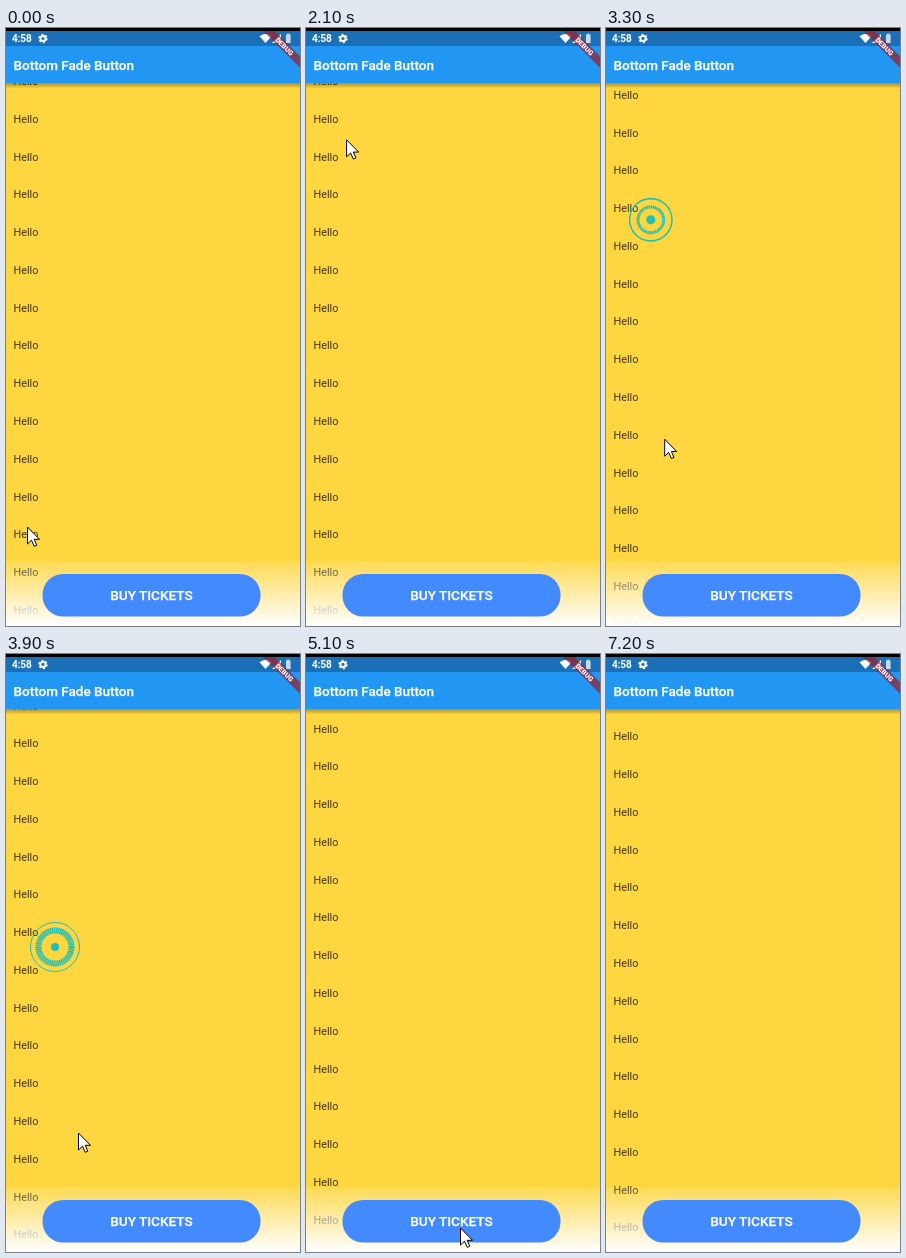
Animation of 294 by 598 pixels, one loop 7.6 s. Source, as an HTML page:

```html
<!DOCTYPE html>
<html lang="en">
<head>
<meta charset="utf-8">
<title>Bottom Fade Button</title>
<style>
  html, body { margin: 0; width: 100%; height: 100%; overflow: hidden; background: #fed640; }
  svg { display: block; width: 294px; height: 598px; font-family: Roboto, sans-serif; }
  .medium { font-weight: 500; fill: #fff; stroke: #fff; stroke-width: .25px; }
  #rows { font-size: 10.8px; fill: rgba(0, 0, 0, .76); }
  #touch { fill: none; stroke: #20bfb8; }
</style>
</head>
<body>
<svg viewBox="0 0 294 598">
  <defs>
    <linearGradient id="fade" x2="0" y2="1">
      <stop stop-color="#fff" stop-opacity=".1"/>
      <stop offset="1" stop-color="#fff"/>
    </linearGradient>
    <linearGradient id="shade" x2="0" y2="1">
      <stop stop-opacity=".3"/>
      <stop offset="1" stop-opacity="0"/>
    </linearGradient>
    <clipPath id="screen"><rect y="3" width="294" height="595"/></clipPath>
  </defs>

  <rect width="294" height="598" fill="#fed640"/>
  <g id="rows"></g>
  <ellipse id="glow" cx="100" cy="602" rx="210" ry="56" fill="#2196f3" opacity="0"/>
  <rect y="533" width="294" height="65" fill="url(#fade)"/>
  <rect x="36.5" y="546" width="218" height="42.5" rx="20.5" fill="#448aff"/>
  <text class="medium" x="145.5" y="572.3" font-size="13.6" text-anchor="middle">BUY TICKETS</text>

  <rect y="55.5" width="294" height="5" fill="url(#shade)"/>
  <rect width="294" height="55.5" fill="#2196f3"/>
  <rect width="294" height="18" fill="#1a6fb6"/>
  <rect width="294" height="3"/>
  <text class="medium" x="6" y="14.2" font-size="10">4:58</text>
  <text class="medium" x="7.5" y="42.1" font-size="13.5">Bottom Fade Button</text>

  <g fill="none" stroke="#fff">
    <circle cx="37" cy="10.5" r="2.6" stroke-width="2"/>
    <circle cx="37" cy="10.5" r="4" stroke-width="1.4" stroke-dasharray="2.1 2.09"/>
  </g>
  <g fill="#fff">
    <path d="M253.5 8.3Q259.5 3.6 265.5 8.3L259.5 15Z"/>
    <path d="M266 15L275 6V15Z"/>
    <path d="M280 6.5h1.3v-1h2v1h1.3v8.5h-4.6Z" opacity=".75"/>
  </g>
  <g clip-path="url(#screen)">
    <g transform="translate(294 3) rotate(45)">
      <rect x="-27" y="17.9" width="54" height="8.1" fill="#a01c28" opacity=".7"/>
      <text y="24.4" font-size="6.9" font-weight="900" fill="#fff" text-anchor="middle">DEBUG</text>
    </g>
  </g>

  <g id="touch">
    <circle id="outer"/>
    <circle id="inner" stroke-dasharray="1.5 .5"/>
    <circle id="dot" fill="#20bfb8" stroke="none"/>
  </g>
  <path id="cursor" d="M-.5 0V17L3.5 13.2L6.2 19.3L8.8 18.2L6.2 12.3H11.5Z"
        fill="#fff" stroke="#000" stroke-linejoin="round"/>
</svg>
<script>
const LOOP = 7600, STEP = 100, PITCH = 37.77, TOP = 53.2;
const FADE = 600, DRAG = 187.3, FLING = 181.9, FLING_TIME = 2000;
const $ = id => document.getElementById(id);
const clamp = v => Math.min(1, Math.max(0, v));
const mix = (a, b, p) => a + (b - a) * p;
const place = (el, x, y) => el.setAttribute('transform', `translate(${x} ${y})`);

// Where the pointer turns: [time, x, y]
const turns = [
  [200, 22, 499], [1000, 27, 228], [1600, 33, 159], [2000, 40, 80],
  [2900, 50, 366], [3900, 73, 479], [4500, 127, 576], [5100, 155, 574],
  [5900, 109, 497], [6100, 137, 239], [6300, 137, 239],
  [6500, 107, 296], [6600, 107, 296], [7200, 48, 600]
];
const push = { down: 600, up: 1050, from: [22, 499], to: [23, 411] };
const pull = { down: 2800, up: 3900, from: [41, 99.7], to: [49, 293] };

const held = (touch, t) => clamp((t - touch.down) / (touch.up - touch.down)) ** .94;

function pointer(t) {
  const i = turns.findIndex(k => k[0] > t);
  if (i < 1) return turns.at(i).slice(1);
  const [t0, x0, y0] = turns[i - 1], [t1, x1, y1] = turns[i];
  const p = (t - t0) / (t1 - t0);
  return [mix(x0, x1, p), mix(y0, y1, p)];
}

// The list follows the finger, then coasts to rest
function scroll(t) {
  const coast = clamp((t - pull.up) / FLING_TIME);
  return DRAG * held(pull, t) + FLING * (1 - (1 - coast) ** 3.44);
}

function ring(id, r, width) {
  $(id).setAttribute('r', r);
  $(id).setAttribute('stroke-width', width);
}

function drawTouch(t) {
  const touch = [push, pull].find(c => t >= c.down && t < c.up + FADE);
  $('touch').style.display = touch ? '' : 'none';
  if (!touch) return;
  const q = held(touch, t), p = clamp((t - touch.up) / FADE);
  place($('touch'), ...touch.from.map((v, n) => mix(v, touch.to[n], q)));
  $('touch').setAttribute('opacity', 1 - .85 * p);
  ring('outer', 18.2 + 6.3 * q + 5.5 * p, 2 - q);
  ring('inner', 9.5 + 7 * q + 12 * p, (.5 + 5.5 * q) * (1 - p) ** 2);
  ring('dot', (5 - q) * (1 - p), 0);
}

for (let i = -1; i < 16; i++) {
  const row = document.createElementNS('http://www.w3.org/2000/svg', 'text');
  row.setAttribute('x', 7.5);
  row.setAttribute('y', TOP + i * PITCH + 3.9);
  row.textContent = 'Hello';
  $('rows').append(row);
}

function draw(now) {
  const t = Math.floor(now % LOOP / STEP) * STEP;
  place($('rows'), 0, scroll(t) % PITCH);
  place($('cursor'), ...pointer(t));
  $('glow').setAttribute('opacity', .3 * Math.sin(Math.PI * clamp((t - 700) / 1200)));
  drawTouch(t);
}

const start = performance.now();
function tick() {
  draw(performance.now() - start);
  requestAnimationFrame(tick);
}
tick();
</script>
</body>
</html>
```
